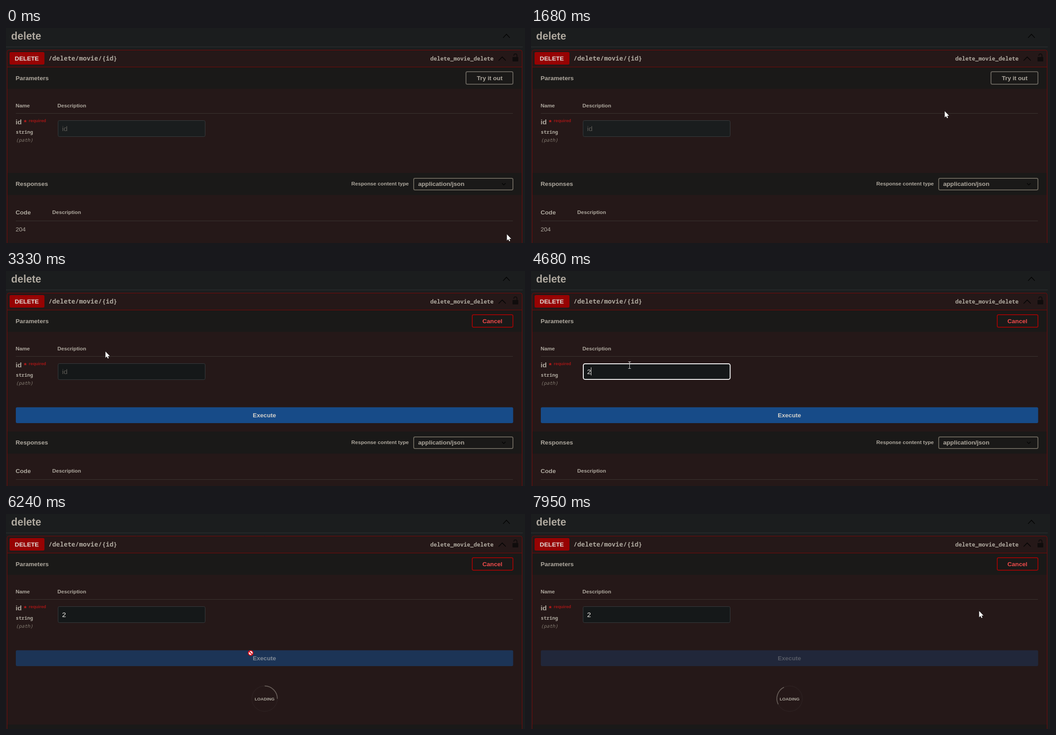
An HTML page with a canvas that plays this animation: 1161 by 482 pixels, repeating every 8000 ms.

```html
<!DOCTYPE html>
<html lang="en">
<head>
<meta charset="utf-8">
<title>Delete endpoint</title>
<style>
  html, body { margin: 0; width: 100%; height: 100%; overflow: hidden; background: #1b1d1e; }
  canvas { display: block; }
</style>
</head>
<body>
<canvas id="stage" width="1161" height="482"></canvas>
<script>
const ctx = document.getElementById('stage').getContext('2d');
const LOOP = 8000;
const OPENED = 2720, FOCUSED = 3810, TYPED = 4680, BLURRED = 6050, LOADING = 6115;
const SANS = '"Liberation Sans", Arial, sans-serif';
const MONO = '"Noto Sans Mono", monospace';
const INK = '#aea89e', PANEL = '#251818', STRIP = '#1a1918', RULE = '#3b3531', RED = '#7c0808';

// Pointer path: time, x, y, shape from that time on
const pointer = [
  [0, 1120, 462, 'arrow'], [70, 1119, 462, 'arrow'], [270, 1119, 462, 'arrow'],
  [370, 1080, 425, 'arrow'], [570, 966, 335, 'arrow'], [900, 966, 335, 'arrow'],
  [970, 965, 332, 'arrow'], [1140, 965, 333, 'arrow'], [1280, 915, 300, 'arrow'],
  [1470, 866, 235, 'arrow'], [1560, 878, 212, 'arrow'], [1680, 924, 186, 'arrow'],
  [1820, 1022, 150, 'arrow'], [1960, 1096, 127, 'arrow'], [2030, 1099, 121, 'hand'],
  [2190, 1099, 117, 'hand'], [2440, 1099, 117, 'hand'], [2500, 1050, 128, 'arrow'],
  [2570, 880, 154, 'arrow'], [2640, 737, 176, 'arrow'], [2700, 737, 176, 'arrow'],
  [2780, 742, 171, 'arrow'], [3040, 741, 171, 'arrow'], [3150, 741, 171, 'arrow'],
  [3190, 650, 173, 'arrow'], [3260, 400, 176, 'arrow'], [3330, 222, 180, 'arrow'],
  [3390, 220, 183, 'arrow'], [3440, 217, 203, 'beam'], [3480, 217, 203, 'beam'],
  [4980, 217, 203, 'beam'], [5110, 265, 226, 'beam'], [5190, 330, 254, 'arrow'],
  [5340, 460, 300, 'arrow'], [5440, 530, 313, 'hand'], [5570, 544, 314, 'hand'],
  [5900, 544, 314, 'hand'], [6115, 541, 305, 'blocked'], [6440, 541, 305, 'blocked'],
  [6520, 560, 298, 'arrow'], [6720, 690, 255, 'arrow'], [6920, 840, 218, 'arrow'],
  [7120, 950, 198, 'arrow'], [7240, 988, 196, 'arrow'], [7350, 1001, 211, 'arrow'],
  [7450, 1002, 217, 'arrow'], [8000, 1002, 217, 'arrow']
];

function text(str, x, y, size, { color = INK, weight = 'bold', family = SANS, align = 'left' } = {}) {
  ctx.font = `${weight} ${size}px ${family}`;
  ctx.fillStyle = color;
  ctx.textAlign = align;
  ctx.fillText(str, x, y);
}

function fill(x, y, w, h, color) {
  ctx.fillStyle = color;
  ctx.fillRect(x, y, w, h);
}

function box(x, y, w, h, radius, background, border, width = 1) {
  ctx.beginPath();
  ctx.roundRect(x, y, w, h, radius);
  if (background) { ctx.fillStyle = background; ctx.fill(); }
  if (border) { ctx.strokeStyle = border; ctx.lineWidth = width; ctx.stroke(); }
}

function line(points, color, width) {
  ctx.beginPath();
  points.forEach(([x, y]) => ctx.lineTo(x, y));
  ctx.strokeStyle = color;
  ctx.lineWidth = width;
  ctx.stroke();
}

function shape(path, scale = 1) {
  ctx.scale(scale, scale);
  const p = new Path2D(path);
  ctx.lineJoin = 'round';
  ctx.lineWidth = 1;
  ctx.strokeStyle = '#111';
  ctx.stroke(p);
  ctx.fillStyle = '#fff';
  ctx.fill(p);
}

function drawHeader() {
  fill(0, 0, 1161, 482, '#1b1d1e');
  text('delete', 11.5, 26, 23.3);
  line([[1112, 22], [1119.5, 14], [1127, 22]], '#050505', 1.6);
  fill(0, 42, 1156, 1, '#303435');

  box(2.5, 49.5, 1152, 500, 4, PANEL, RED);
  fill(3, 87, 1151, 1, RED);
  box(8, 54, 78, 28, 3, '#970303');
  text('DELETE', 46.5, 73, 13.7, { color: '#e0dcd7', align: 'center' });
  text('/delete/movie/{id}', 95, 73, 14.26, { family: MONO });
  text('delete_movie_delete', 949, 73, 12.45, { family: MONO });
  line([[1102, 73], [1110, 65], [1118, 73]], '#050505', 1.6);
  box(1133, 65, 13, 10, 1, '#100c0c');
  ctx.beginPath();
  ctx.moveTo(1136, 62);
  ctx.arc(1139.5, 61.5, 3.5, Math.PI, 0);
  ctx.lineTo(1143, 66);
  ctx.strokeStyle = '#100c0c';
  ctx.lineWidth = 2;
  ctx.stroke();
}

function drawParameters(t) {
  fill(3, 88, 1151, 48, STRIP);
  fill(3, 136, 1151, 1, '#201818');
  text('Parameters', 21.5, 117, 13.6);
  if (t < OPENED) {
    box(1029, 98, 105, 28, 3, null, '#66625b', 2);
    text('Try it out', 1082, 117, 13.6, { align: 'center' });
  } else {
    box(1043, 98, 91, 28, 3, null, '#960505', 2);
    text('Cancel', 1088, 117, 13.6, { color: '#ef4b4b', align: 'center' });
  }

  text('Name', 21.5, 177.5, 11.7);
  text('Description', 115, 177.5, 11.7);
  fill(22, 191, 1112, 1, RULE);
  text('id', 21.5, 216, 15.5);
  text('*', 40, 216, 15.5, { color: '#c41c1c' });
  text('required', 51, 211, 9.7, { color: '#a31616' });
  text('string', 22, 237, 10.67, { family: MONO });
  text('(path)', 22, 254.5, 10.67, { family: MONO, weight: 'italic', color: '#857d72' });

  const focused = t >= FOCUSED && t < BLURRED;
  const background = t < OPENED ? '#1a1d1e' : '#151819';
  if (focused) box(117, 208, 328.5, 35, 4, background, '#f4f4f4', 2);
  else box(116.5, 207.5, 329, 36, 3, background, '#383d3f');

  const typed = t >= TYPED;
  text(typed ? '2' : 'id', 125.5, 230.5, 15.5, { weight: 'normal', color: typed ? '#f0eee9' : '#5e5b56' });
  const blinkStart = typed ? TYPED : FOCUSED + 55;
  if (focused && Math.floor(Math.max(0, t - blinkStart) / 545) % 2 === 0) {
    fill(typed ? 134 : 126, 216, 1, 18, '#f0eee9');
  }
}

// CSS "ease" timing curve, solved for time by bisection
function ease(p) {
  let lo = 0, hi = 1;
  const bezier = (u, a, b) => 3 * u * (1 - u) ** 2 * a + 3 * u * u * (1 - u) * b + u ** 3;
  for (let i = 0; i < 16; i++) {
    const mid = (lo + hi) / 2;
    if (bezier(mid, .25, .25) < p) lo = mid; else hi = mid;
  }
  return bezier(lo, .1, 1);
}

function drawExecute(t) {
  const fade = Math.min(1, Math.max(0, (t - LOADING - 15) / 300));
  ctx.globalAlpha = 1 - .7 * ease(fade);
  box(22, 305.5, 1112.5, 35.5, 3, '#174b88');
  text('Execute', 578, 328, 13.6, { color: '#d2d0cb', align: 'center' });
  ctx.globalAlpha = 1;
}

function drawResponses(dy) {
  ctx.save();
  ctx.translate(0, dy);
  fill(3, 325, 1151, 49, STRIP);
  fill(3, 374, 1151, 1, '#201818');
  text('Responses', 21.5, 354, 13.6);
  text('Response content type', 772.5, 353, 11.7);
  box(912, 337, 222, 26, 3, STRIP, '#69645a', 2);
  text('application/json', 922, 354, 13.6);
  line([[1109.5, 348], [1113.5, 352], [1117.5, 348]], '#050505', 1.5);
  text('Code', 21.5, 417.5, 13.6);
  text('Description', 103.5, 416.5, 11.7);
  fill(22, 432, 1112, 1, RULE);
  text('204', 21.5, 455.5, 13.6, { weight: 'normal' });
  ctx.restore();
}

function drawLoading(t) {
  const turn = .125 + (t - 6240) * .00098;
  const start = (turn - .375) * 2 * Math.PI;
  const ring = (from, sweep, color) => {
    ctx.beginPath();
    ctx.arc(578.5, 414, 28.5, from, from + sweep);
    ctx.strokeStyle = color;
    ctx.lineWidth = 1.9;
    ctx.stroke();
  };
  ring(0, 2 * Math.PI, '#2b1f1f');
  ring(start, Math.PI / 2, '#655b56');
  text('LOADING', 578.5, 417.5, 9.7, { align: 'center' });
  fill(3, 472, 1151, 10, STRIP);
}

const cursors = {
  arrow: () => shape('M.6 .6V16.6L4.2 13.2 6.6 18.6 9 17.6 6.7 12.3H11.8Z', .87),
  hand: () => {
    shape('M4 1.8Q4 .5 5.3 .5T6.6 1.8V7Q8.6 6 9.2 7.6 10.8 6.8 11.4 8.2 13.2 7.8 13.2 9.8V14L11.6 17V19.5H4.8V17.6L1 12.2Q.2 10.5 1.6 10.2 2.8 10 4 12Z');
    [6.7, 9.1, 11.3].forEach(x => line([[x, 7.5], [x, 10.5]], '#333', .8));
  },
  beam: () => {
    line([[.5, .5], [6.5, .5]], '#ddd', 1);
    line([[3.5, .5], [3.5, 15.5]], '#ddd', 1);
    line([[.5, 15.5], [6.5, 15.5]], '#ddd', 1);
  },
  blocked: () => {
    ctx.beginPath();
    ctx.arc(6.3, 6.5, 5.3, 0, 2 * Math.PI);
    ctx.fillStyle = '#fff';
    ctx.fill();
    ctx.strokeStyle = '#d80d18';
    ctx.lineWidth = 2;
    ctx.stroke();
    line([[2.8, 3], [9.8, 10]], '#d80d18', 2);
  }
};

function drawPointer(t) {
  const next = pointer.findIndex(key => key[0] > t);
  const [t0, x0, y0, kind] = pointer[next - 1];
  const [t1, x1, y1] = pointer[next];
  const p = (t - t0) / (t1 - t0);
  ctx.save();
  ctx.translate(Math.round(x0 + (x1 - x0) * p), Math.round(y0 + (y1 - y0) * p));
  cursors[kind]();
  ctx.restore();
}

function draw(t) {
  drawHeader();
  drawParameters(t);
  if (t >= OPENED) drawExecute(t);
  if (t < LOADING) drawResponses(t < OPENED ? 0 : 35);
  else drawLoading(t);
  drawPointer(t);
}

const began = performance.now();
function tick() {
  draw((performance.now() - began) % LOOP);
  requestAnimationFrame(tick);
}
tick();
</script>
</body>
</html>
```
